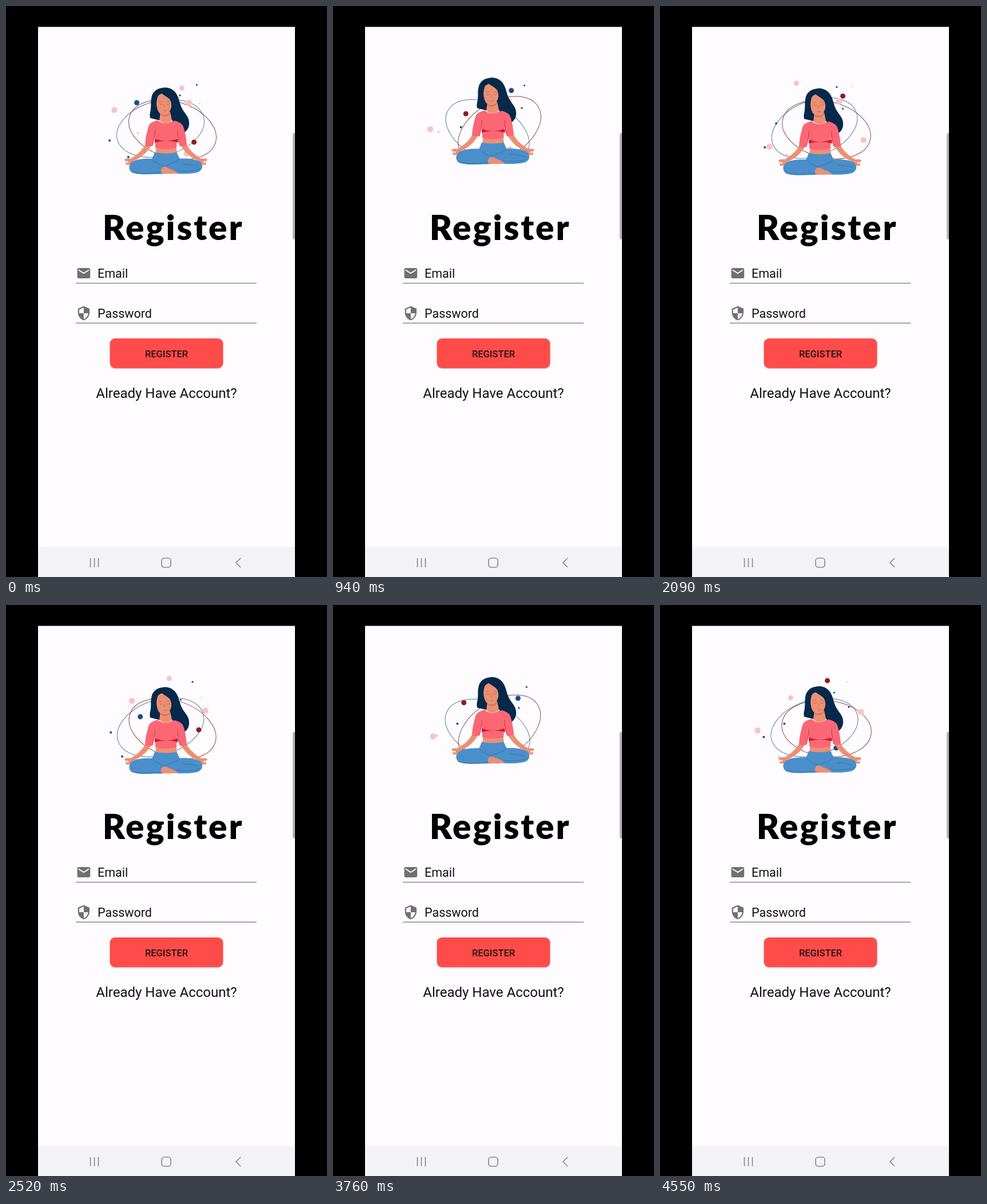
Recreate the animation shown at these times as an HTML page. Size 561 px wide and 998 px high, loop 4.58 s.

```html
<!DOCTYPE html>
<html lang="en">
<head>
<meta charset="utf-8">
<title>Register</title>
<style>
  html, body { margin: 0; width: 100%; height: 100%; overflow: hidden; background: #000; }
  svg { display: block; width: 561px; height: 998px; }
  text { font-family: Roboto, sans-serif; fill: #111; }
  .title { font: 900 60px Lato, sans-serif; letter-spacing: 3px; fill: #000; }
  .line { stroke: #8b8a8c; stroke-width: 1.5; }
  .ring { fill: none; stroke-width: 1; }
  .nav { fill: none; stroke: #8b8a8d; stroke-width: 1.7; }
  .icon { fill: #707072; }
  .skin { fill: #ec9074; }
  .hair { fill: #04294a; }
  .top { fill: #fb6775; }
  .pants { fill: #4a8fca; }
  .fold { fill: none; stroke: #2f6da8; stroke-width: .8; stroke-linecap: round; }
  .face { fill: none; stroke: #b5574b; stroke-width: .7; stroke-linecap: round; }
</style>
</head>
<body>
<svg viewBox="0 0 561 998">
  <rect width="561" height="998"/>
  <rect x="56" y="36.500" width="449" height="962" fill="#fefcff"/>
  <path d="M505 222h-1a3 3 0 0 0-3 3v180a3 3 0 0 0 3 3h1z" fill="#b4b3b5"/>

  <ellipse id="blueRing" class="ring" rx="78" ry="48" stroke="#5980a6"/>
  <ellipse id="redRing" class="ring" rx="78.5" ry="49" stroke="#8d4b4b"/>
  <g id="dots"></g>

  <g id="yogi">
    <path class="hair" d="M275 142C263 143 255 150 254 161C252 170 255 175 253 182C251 187 251 191 252 195L268 199H292C297 208 300 216 307 221C314 222 321 212 320 203C320 193 313 188 308 179C302 168 303 158 295 149C289 143 282 141 275 142Z"/>
    <g id="half">
      <path class="skin" d="M245 238C240 250 230 259 218 266C214 266 209 265 207 268C207 270 210 270 211 271C209 273 208 276 211 277C217 278 220 273 223 270C236 265 250 253 255 239Z"/>
      <circle cx="212.5" cy="272" r="1.6" fill="#fefcff"/>
    </g>
    <use href="#half" transform="matrix(-1 0 0 1 559 0)"/>
    <path class="skin" d="M263 242H297L299 258H261Z"/>
    <path class="pants" d="M260 255Q279 259 298 255C301 259 301 263 304 266C318 265 333 267 340 272C346 279 343 287 335 290C320 294 300 292 286 292L270 293C252 293 234 295 222 291C214 288 213 277 220 272C229 266 243 266 255 266C258 262 258 259 260 255Z"/>
    <path class="fold" d="M219 289C238 294 256 291 272 290M302 267C298 273 286 275 276 279M257 268C261 273 269 277 276 279M294 287C312 289 330 288 339 284M310 276Q326 276 336 280"/>
    <path class="skin" d="M272 283C275 279 280 280 284 283C289 285 297 287 300 291C295 293 280 293 273 292C270 290 270 286 272 283Z"/>
    <path class="top" d="M265 199C258 201 251 203 249 210C246 221 243 232 243 243Q249 246 256 244L260 228L261 247Q279 252 298 247L299 228L304 244Q310 246 316 242C315 231 313 219 310 210C307 203 300 201 292 199Q279 210 265 199Z"/>
    <path d="M260 231Q279 239 300 231L301 238Q280 232 260 238Z" fill="#cf1b2b"/>
    <path d="M260 216Q261 225 256 243M300 216Q299 225 304 243" fill="none" stroke="#c73447" stroke-width=".9"/>
    <path class="skin" d="M270 184L268 199Q279 210 290 199L287 184Z"/>
    <path d="M271 187Q279 193 287 185V187Q279 196 271 190Z" fill="#d0735c"/>
    <path class="skin" d="M264 158C262 168 263 182 269 187Q276 192 283 187C289 182 291 170 289 161Q278 144 264 158Z"/>
    <path class="hair" d="M270 147C266 153 264 160 263 167C260 173 262 181 265 187C265 193 258 196 252 195C252 187 253 176 255 162Q259 146 270 147Z"/>
    <path class="hair" d="M268 147C272 156 285 157 288 166C291 177 287 190 292 201C302 198 303 176 299 160Q289 142 268 147Z"/>
    <path class="face" d="M268 170.500Q271 173 274 171M280 171Q283 173 286 170.500M277 172V176M275 182Q278 184 281 182M268 167L273 166M281 166L286 167"/>
  </g>

  <text class="title" x="292" y="409" text-anchor="middle">Register</text>

  <path class="icon" transform="translate(122.300 453.500) scale(1.130)" d="M20 4H4c-1.100 0-2 .9-2 2v12c0 1.100.9 2 2 2h16c1.100 0 2-.9 2-2V6c0-1.100-.9-2-2-2zm0 4l-8 5-8-5V6l8 5 8-5z"/>
  <text x="160" y="475" font-size="21.500">Email</text>
  <path class="line" d="M122 484.500H438"/>

  <path class="icon" transform="translate(122.300 523.400) scale(1.130)" d="M12 1L3 5v6c0 5.550 3.840 10.740 9 12 5.160-1.260 9-6.450 9-12V5zm0 11h7c-.53 4.120-3.280 7.790-7 8.940V12H5V6.300l7-3.110z"/>
  <text x="160" y="545" font-size="21.500">Password</text>
  <path class="line" d="M122 554.200H438"/>

  <rect x="182" y="583" width="197" height="52" rx="9" fill="#000" opacity=".15"/>
  <rect x="181.500" y="581" width="198" height="52" rx="9" fill="#ff4c4a"/>
  <text x="280.500" y="614" font-size="16.500" font-weight="500" text-anchor="middle" style="fill:#25100f">REGISTER</text>
  <text x="280.500" y="685" font-size="24" text-anchor="middle">Already Have Account?</text>

  <rect x="56" y="945.500" width="449" height="53" fill="#f3f2f4"/>
  <path class="nav" d="M147.500 965V981M154.500 965V981M161.500 965V981M410 965L402 973L410 981"/>
  <rect class="nav" x="272" y="965" width="16" height="16" rx="4.500"/>
</svg>
<script>
  const LOOP = 4580, BOB = 2600, ORBIT = 2700, TAU = Math.PI * 2;
  const $ = id => document.getElementById(id);
  const NAVY = '#1b4a92', WINE = '#8f1c22', PINK = '#fac3c4';

  // x and y: centre, cosine part, sine part; each dot: start angle, radius, colour
  const orbits = [
    { x: [267, 97, 0], y: [213, 0, 52], dir: -1,
      dots: [[217, 5.3, PINK], [303, 5.3, PINK], [60, 5.3, PINK]] },
    { x: [283, 53, 13], y: [187, 7, 63], dir: 1,
      dots: [[190, 4.5, NAVY], [310, 4.5, PINK], [47, 4.5, WINE]] },
    { x: [207, 26, 0], y: [235, 0, 30], dir: -1,
      dots: [[-25, 2, PINK], [180, 2, NAVY], [75, 2, NAVY]] },
    { x: [323, 19, 0], y: [157, 0, 23], dir: 1,
      dots: [[35, 1.3, PINK], [182, 1.6, NAVY], [-57, 1.6, NAVY]] }
  ];

  const along = ([mid, c, s], a) => mid + c * Math.cos(a) + s * Math.sin(a);

  const movers = orbits.flatMap(({ x, y, dir, dots }) => dots.map(([deg, r, fill]) => {
    const el = document.createElementNS('http://www.w3.org/2000/svg', 'circle');
    el.setAttribute('r', r);
    el.setAttribute('fill', fill);
    $('dots').append(el);
    return t => {
      const a = TAU * (deg / 360 + dir * t / ORBIT);
      el.setAttribute('cx', along(x, a));
      el.setAttribute('cy', along(y, a));
    };
  }));

  const wave = (t, shift = 0) => Math.sin(TAU * ((t - 1640) / BOB + shift));
  const place = (id, x, y, turn = 0) =>
    $(id).setAttribute('transform', `translate(${x} ${y}) rotate(${turn})`);

  function draw(t) {
    const w = wave(t);
    place('yogi', 0, -6.6 + 9.9 * w);
    place('blueRing', 270, 216 - 3 * w, 2 - 25 * wave(t, .015));
    place('redRing', 291, 216, -6 + 26 * wave(t, -.04));
    movers.forEach(move => move(t));
  }

  const start = performance.now();
  function tick() {
    draw((performance.now() - start) % LOOP);
    requestAnimationFrame(tick);
  }
  tick();
</script>
</body>
</html>
```
